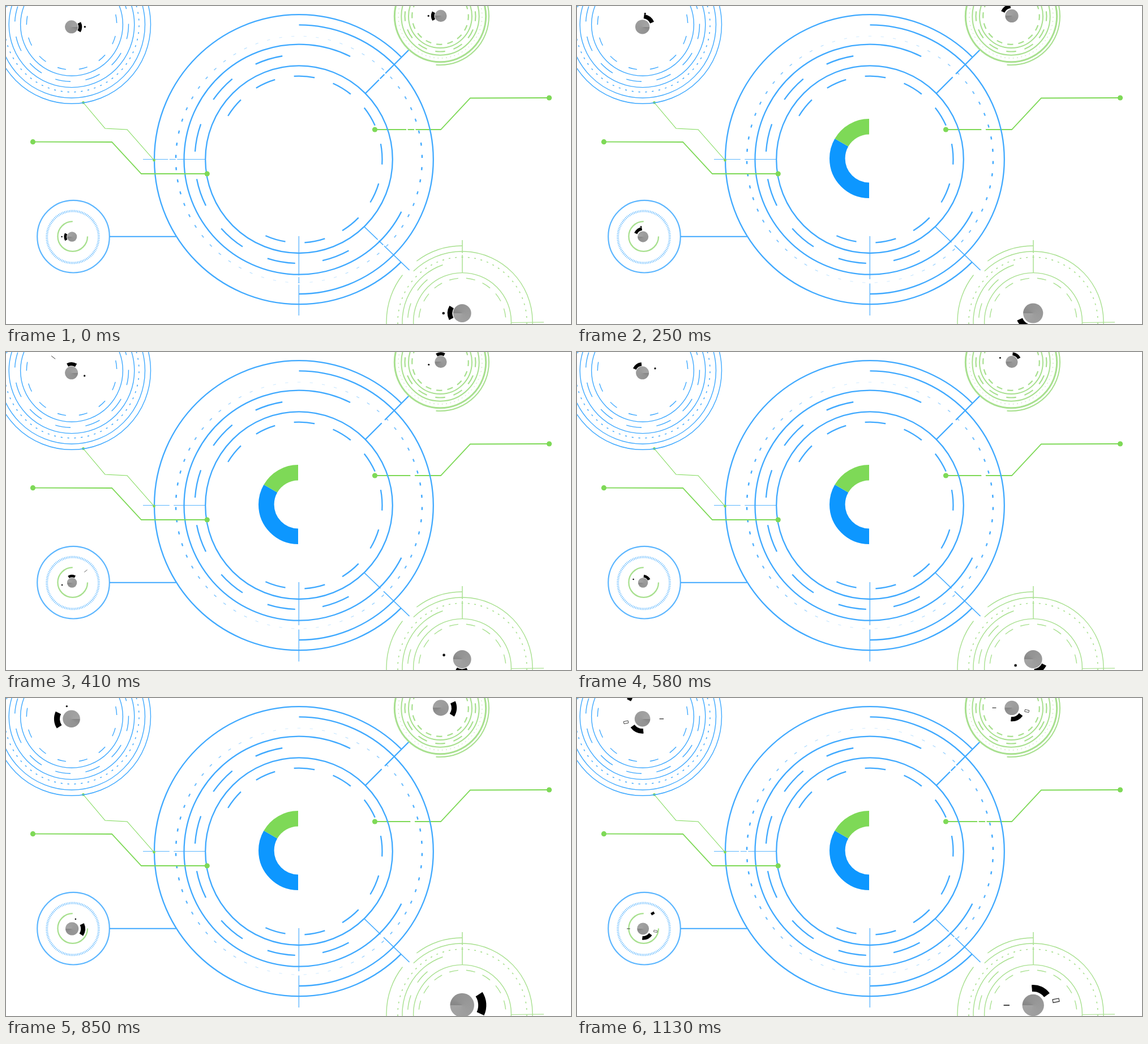
An HTML page with a canvas for the animation above (1160 ms loop, 998x561 px).

```html
<!DOCTYPE html>
<html lang="en">
<head>
<meta charset="utf-8">
<title>Dials</title>
<style>
html, body { margin: 0; width: 100%; height: 100%; overflow: hidden; background: #fff; }
canvas { display: block; width: 998px; height: 561px; }
</style>
</head>
<body>
<canvas id="stage" width="998" height="561"></canvas>
<script>
const ctx = document.getElementById('stage').getContext('2d');
const LOOP = 1160;
const BLUE = '#3fa9ff', SOFT_BLUE = '#5cb6ff', PALE_BLUE = '#78c2ff';
const GREEN = '#7ed957', SOFT_GREEN = '#a8e08f';
const RAD = Math.PI / 180;

// Angles are degrees clockwise from twelve o'clock
function arc(x, y, r, from, to, color, width) {
  ctx.beginPath();
  ctx.arc(x, y, r, (from - 90) * RAD, (to - 90) * RAD);
  ctx.strokeStyle = color;
  ctx.lineWidth = width;
  ctx.stroke();
}

const ring = (x, y, r, color, width) => arc(x, y, r, 0, 360, color, width);

function dashes(x, y, r, first, step, count, span, color, width) {
  for (let i = 0; i < count; i++) {
    const a = first + i * step;
    arc(x, y, r, a - span / 2, a + span / 2, color, width);
  }
}

const dots = (x, y, r, color, width) => dashes(x, y, r, 0, 360 / 63, 63, 1.5, color, width);

// Dotted ring that thins out toward the top and bottom
function fadingDots(x, y, r, shift, color, width) {
  for (let i = 0; i < 63; i++) {
    const a = i * 360 / 63 + shift;
    const k = Math.sin(a * RAD) ** 2;
    ctx.globalAlpha = 0.3 + 0.7 * k;
    arc(x, y, r, a - 0.7, a + 0.7, color, width * (0.3 + 0.7 * k));
  }
  ctx.globalAlpha = 1;
}

function line(points, color, width) {
  ctx.beginPath();
  points.forEach(([x, y]) => ctx.lineTo(x, y));
  ctx.strokeStyle = color;
  ctx.lineWidth = width;
  ctx.stroke();
}

function disc(x, y, r, color) {
  ctx.beginPath();
  ctx.arc(x, y, r, 0, 2 * Math.PI);
  ctx.fillStyle = color;
  ctx.fill();
}

function connector(points, r, width) {
  line(points, GREEN, width);
  [points[0], points[points.length - 1]].forEach(([x, y]) => disc(x, y, r, GREEN));
}

function mainDial(t) {
  const x = 517.5, y = 270.7;
  const seam = t < 30 || t >= 1130;

  line([[712.5, 76.5], [634, 155]], BLUE, 2.3);
  line([[633, 389.5], [712.5, 466]], BLUE, 1.6);
  line([[242, 270.5], [352, 270.5]], SOFT_BLUE, 1.2);
  line([[517.3, 406], [517.3, 546]], PALE_BLUE, 1.7);
  connector([[651.5, 218], [768, 218], [820, 162.5], [959.5, 162]], 4.6, 1.8);

  // A white band cuts the spokes; it opens into two thin ones at the seam
  if (seam) {
    ring(508, 270, 207, '#fff', 2.5);
    ring(508, 270, 220.5, '#fff', 2.5);
  } else {
    ring(508.5, 270, 216, '#fff', 7.5);
  }
  fadingDots(x, y, 217.5, seam ? 2.85 : 0, BLUE, 2.5);

  arc(x, y, 255.5, 135, 405, BLUE, 2.3);
  arc(x, y, 237.3, 0, 180, BLUE, 2.3);
  arc(x, y, 203, 117, 386.5, BLUE, 2.3);
  ring(x, y, 165.3, BLUE, 2.3);
  dashes(x, y - 0.8, 184, 159.2, 30.65, 7, 15.5, BLUE, 2.3);
  dashes(x, y, 147, 308.6, 27.55, 10, 14.3, BLUE, 2.3);

  connector([[47.5, 239.7], [187, 240], [239, 296], [355.2, 296]], 4.6, 1.8);
  connector([[136.5, 170.5], [175, 216], [214, 218], [261.5, 272]], 2.4, 1.1);
}

function blueDial() {
  const x = 116, y = 32.8;
  [139.5, 129.5, 110.8, 90.4].forEach(r => ring(x, y, r, BLUE, 1.4));
  dots(x, y, 119, BLUE, 1.5);
  dashes(x, y, 100.5, 5, 30.65, 12, 15.5, BLUE, 1.4);
  dashes(x, y, 79.7, 55, 27.55, 10, 11, BLUE, 1.4);
}

function greenDial() {
  const x = 767, y = 18;
  ring(x, y, 80.7, SOFT_GREEN, 3);
  arc(x, y, 86, 0, 185, SOFT_GREEN, 2);
  ring(x, y, 68.7, SOFT_GREEN, 2);
  ring(x, y, 56, SOFT_GREEN, 2);
  dots(x, y, 74, SOFT_GREEN, 0.8);
  dashes(x, y, 62.5, 0, 30, 12, 16, SOFT_GREEN, 2.2);
  dashes(x, y, 49.8, 2, 22.5, 16, 12, SOFT_GREEN, 2.2);
}

function halfDial() {
  const x = 806, y = 557;
  arc(x, y, 134, 200, 308, SOFT_GREEN, 1.4);
  arc(x, y, 134, 323, 360, SOFT_GREEN, 1.4);
  arc(x, y, 124, 316, 500, SOFT_GREEN, 1.4);
  arc(x, y, 106, 230, 341, SOFT_GREEN, 1.4);
  ring(x, y, 86.4, SOFT_GREEN, 1.4);
  dots(x, y, 114, SOFT_GREEN, 1.6);
  dashes(x, y, 96.5, 282, 30.65, 2, 15.5, SOFT_GREEN, 1.4);
  dashes(x, y, 77, -78.5, 22.4, 8, 12, SOFT_GREEN, 1.4);
  line([[806, 413], [806, 436]], SOFT_GREEN, 1.5);
  line([[806, 439], [806, 471]], SOFT_GREEN, 1.5);
  line([[892, 558.5], [950, 557.8]], SOFT_GREEN, 1.2);
}

function smallDial() {
  ring(119, 406.7, 63.8, SOFT_BLUE, 2.2);
  dashes(118, 407.5, 45.8, 0, 3.6, 100, 1.3, SOFT_BLUE, 4);
  arc(117.7, 406.5, 26.3, 90, 360, SOFT_GREEN, 2.3);
  line([[183, 406.8], [300, 406.8]], BLUE, 2);
}

// Smooth hump of height 1 around mid
function hump(t, mid, half) {
  const d = Math.min(1, Math.abs(t - mid) / half);
  return Math.cos(d * Math.PI / 2) ** 2;
}

// The orbiting dot speeds up through one full turn, then through three quarters
function orbit(t) {
  return t < 415
    ? -360 * (t / 415) ** 3
    : -270 * ((t - 415) / 715) ** 1.8;
}

function box(x, y, w, h, turn, filled) {
  ctx.save();
  ctx.translate(x, y);
  ctx.rotate(turn);
  ctx.fillStyle = '#000';
  ctx.strokeStyle = '#222';
  ctx.lineWidth = 0.8;
  if (filled) ctx.fillRect(-w / 2, -h / 2, w, h);
  else ctx.strokeRect(-w / 2, -h / 2, w, h);
  ctx.restore();
}

function spinner(x, y, scaleX, scaleY, t) {
  const burst = hump(t, 300, 80) + hump(t, 850, 110);
  const swell = 0.33 * burst + 0.2 * hump(t, 1130, 40);
  ctx.save();
  ctx.translate(x, y);
  ctx.scale(scaleX, scaleY);

  const shade = ctx.createConicGradient(0, 0, 0);
  shade.addColorStop(0, '#858585');
  shade.addColorStop(0.13, '#929292');
  shade.addColorStop(1, '#a4a4a4');
  disc(0, 0, 11.5 * (1 + swell), shade);

  const a = orbit(t) * RAD;
  disc(23.7 * Math.cos(a), 23.7 * Math.sin(a), 1.7, '#111');

  if (burst > 0) {
    const inner = 12.4 + 24.5 * swell, thick = inner / 2;
    const mid = 37 - 131 * (t - 250) / 600;
    arc(0, 0, inner + thick / 2, mid - 29, mid + 29, '#000', thick);
  }
  if (t >= 380 && t < 480) line([[-35.5, -30], [-28.5, -24.5]], '#222', 0.9);
  if (t >= 1060) {
    line([[30, 0], [37.5, 0]], '#222', 1.2);
    box(-29, 6, 8, 4, -0.2, false);
    box(-22.5, -35.5, 8, 6, 0.5, true);
  }
  ctx.restore();
}

function halfRing() {
  const x = 516, y = 269, r = 56.2, w = 27.6;
  arc(x, y, r, 180, 300, '#0d97ff', w);
  arc(x, y, r, 300, 360, GREEN, w);
}

function draw(now) {
  const t = now % LOOP;
  ctx.fillStyle = '#fff';
  ctx.fillRect(0, 0, 998, 561);
  mainDial(t);
  blueDial();
  greenDial();
  halfDial();
  smallDial();
  spinner(115.6, 36.8, 1, 1, t);
  spinner(768, 17.4, -0.92, 0.92, t);
  spinner(116.6, 407, -0.76, 0.76, t);
  spinner(805.7, 542, -1.39, -1.39, t);
  if (t >= 30) halfRing();
}

let start;
function tick(now) {
  if (start === undefined) start = now;
  draw(Math.max(0, now - start));
  requestAnimationFrame(tick);
}
draw(0);
requestAnimationFrame(tick);
</script>
</body>
</html>
```
